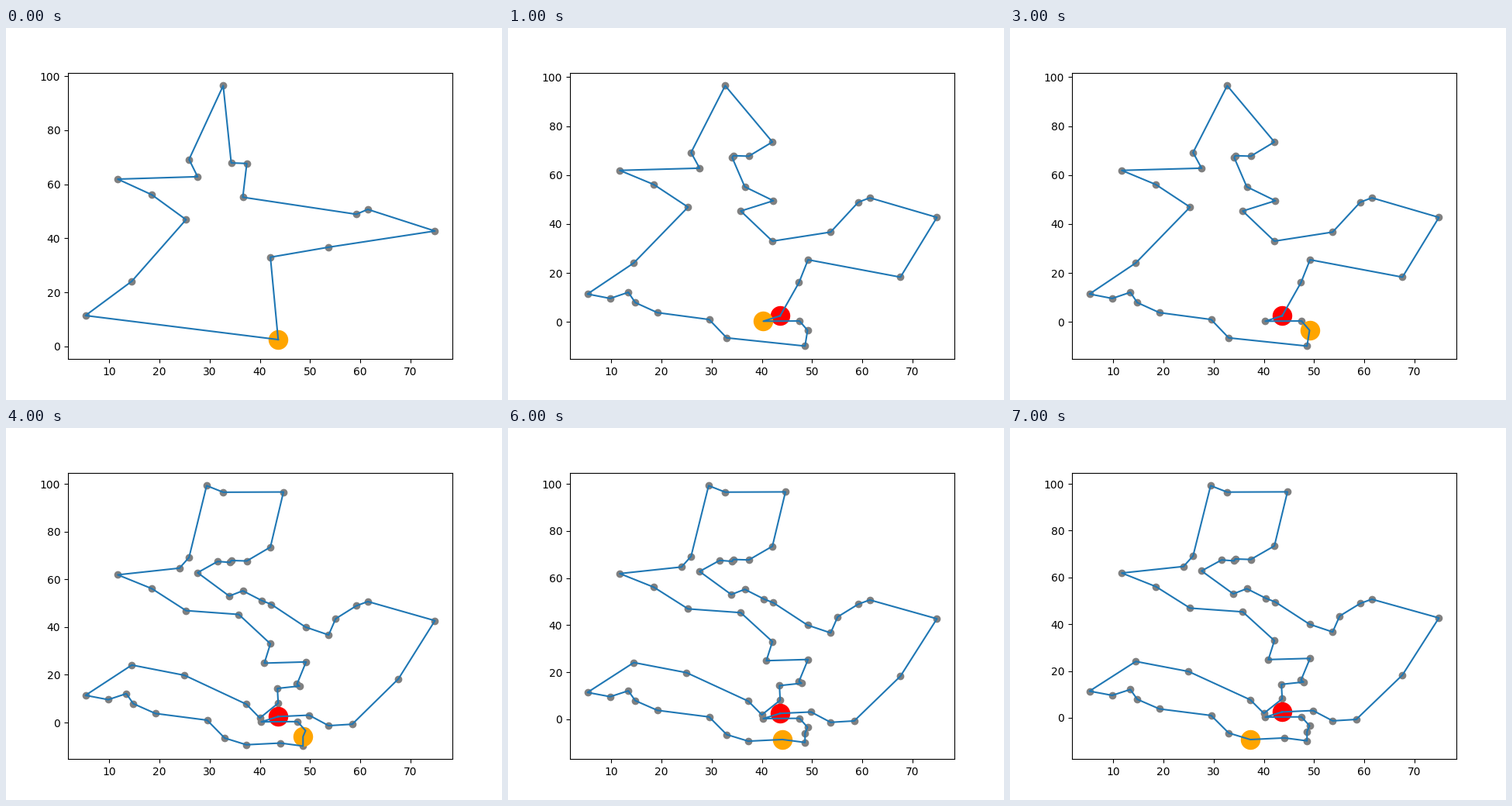
These frames come from a looping animation (640x480 px, 8000 ms). A matplotlib script:

```python
import numpy as np
import matplotlib.pyplot as plt
from matplotlib.animation import FuncAnimation

# Key points: the cities in the order of the complete round trip
ROUTE = np.array([
    (43.65, 2.5), (49.8, 3.1), (53.7, -1.3), (58.4, -0.7), (67.6, 18.3),
    (74.87, 42.7), (61.5, 50.7), (59.2, 48.9), (55.1, 43.5), (53.7, 36.7),
    (49.1, 40), (42.3, 49.5), (40.4, 51.1), (36.6, 55.2), (33.9, 53),
    (27.6, 62.8), (31.6, 67.5), (34.1, 67.1), (34.3, 67.9), (37.4, 67.7),
    (42.1, 73.5), (44.7, 96.6), (32.7, 96.5), (29.4, 99.25), (25.9, 69.2),
    (24, 64.7), (11.7, 61.9), (18.5, 56.1), (25.3, 46.9), (35.8, 45.3),
    (42.1, 33), (40.9, 24.9), (49.2, 25.4), (47.4, 16.1), (47.9, 15.3),
    (43.5, 14.3), (43.65, 8.1), (40, 1.9), (37.3, 7.7), (25, 19.8),
    (14.5, 24.1), (5.27, 11.4), (9.8, 9.6), (13.4, 12.1), (14.8, 7.9),
    (19.2, 3.8), (29.5, 1), (33, -6.5), (37.3, -9.3), (44.1, -8.6),
    (48.6, -9.85), (48.6, -5.9), (49.1, -3.4), (47.5, 0.4), (40.3, 0.3),
])
NAMES = "abcdefghijklmnopqrstuvwxyzABCDEFGHIJKLMNOPQRSTUVWXYZ012"

# Second at which each new plan starts, and the order of its stops
PLANS = {
    0: "aPOCBApywstnhgfjE",
    1: "aHGefghjEDlnrstuwypABCOPQRSTUVY012",
    4: NAMES,
}
SECONDS = 8
MARGIN = 0.05
MARKER_ROOM = 0.0255  # room kept under the traveller, as part of the height


def tour_at(second):
    plan = PLANS[max(start for start in PLANS if start <= second)]
    return ROUTE[[NAMES.index(name) for name in plan + plan[0]]]


def padded(low, high):
    pad = MARGIN * (high - low)
    return low - pad, high + pad


def draw(second):
    x, y = tour_at(second).T
    home = ROUTE[0]
    here = ROUTE[-second]  # the trip runs backwards, one city a second
    ax.clear()
    ax.scatter(x, y, color="gray")
    if second:
        ax.scatter(*home, s=300, color="red")
    ax.scatter(*here, s=300, color="orange")
    ax.plot(x, y)
    ax.set_xticks(range(10, 71, 10))
    ax.set_yticks(range(0, 101, 20))
    floor = min(y.min(), here[1] - MARKER_ROOM * np.ptp(y))
    ax.set_xlim(padded(x.min(), x.max()))
    ax.set_ylim(padded(floor, y.max()))
    return []


fig, ax = plt.subplots(figsize=(6.4, 4.8), dpi=100)
anim = FuncAnimation(fig, draw, frames=SECONDS, init_func=lambda: [],
                     interval=1000, repeat=True, repeat_delay=0)
plt.show()
```
